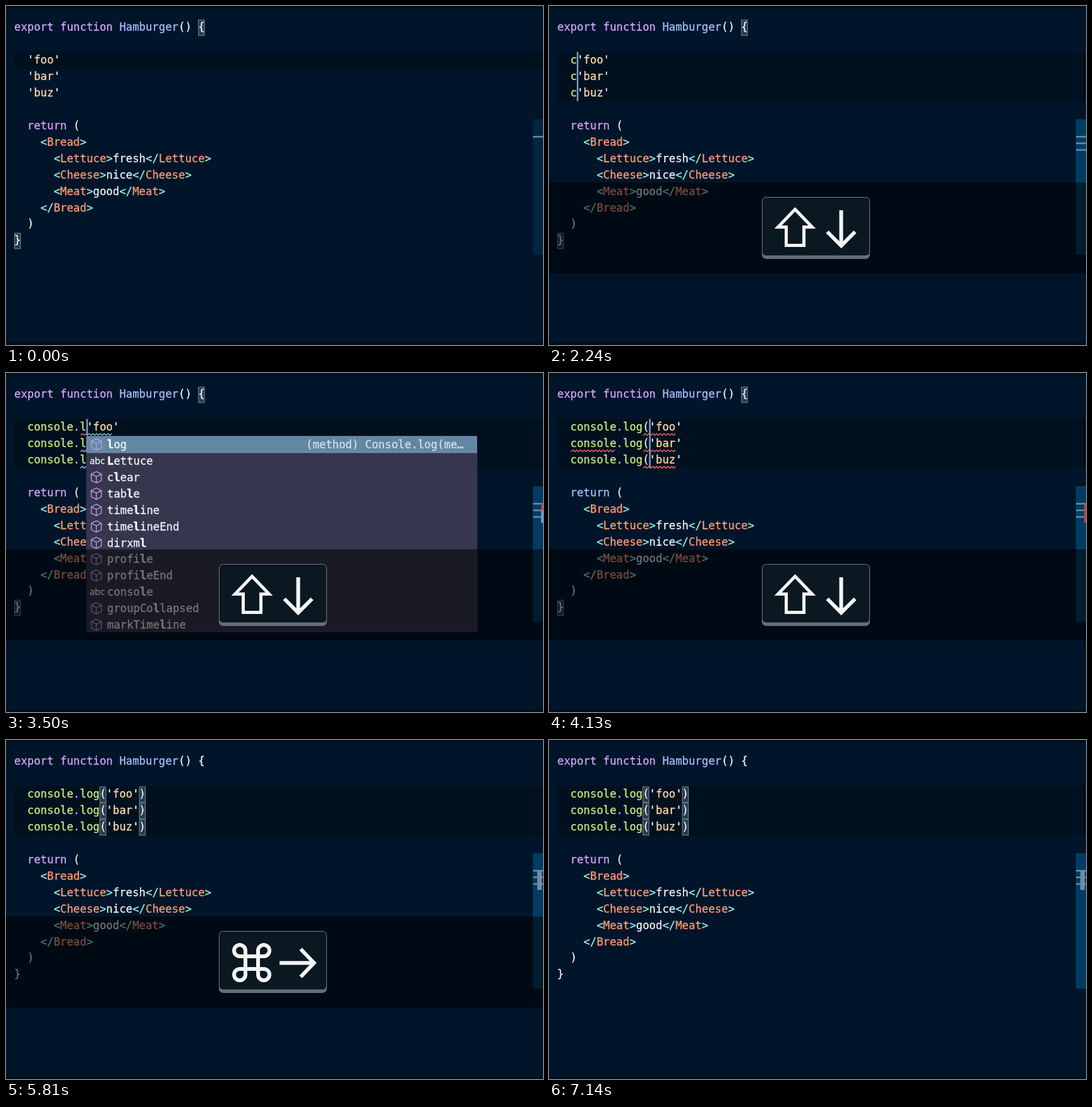
Recreate the animation shown at these times as an HTML page. Size 850x536 px, loop 7210 ms.

```html
<!DOCTYPE html>
<html lang="en">
<head>
<meta charset="utf-8">
<title>Multi-cursor editing</title>
<style>
  html, body { margin: 0; width: 100%; height: 100%; overflow: hidden; background: #001529; }
  svg { display: block; width: 850px; height: 536px; }
  text {
    font: 17.27px "DejaVu Sans Mono", monospace; white-space: pre;
    color: #f1f4f9; fill: currentColor; stroke: currentColor; stroke-width: .3;
  }
  .kw { color: #d3a5fa; }
  .fn { color: #a6bfff; }
  .str { color: #fddbaa; }
  .quote { color: #f2fbf5; }
  .tag { color: #ff9c77; }
  .angle { color: #92f3e6; }
  .var { color: #c9ee80; }
  .hit { font-weight: bold; color: #fff; }
  .hint { color: #d3e0ea; }
  .abc { font: 14.5px "Open Sans", sans-serif; }
  .active { fill: #00101f; }
  .match { fill: #263b4b; stroke: #7d8b94; stroke-width: 1; }
  .caret { fill: #80a4c2; }
  .wave { fill: none; stroke-width: 1.5; }
  .cube { fill: none; stroke: #b79bdc; stroke-width: 1.4; stroke-linejoin: round; }
  .cap { fill: #0a1822; stroke: #727b82; }
  .glyph { fill: none; stroke: #f4f5f5; }
</style>
</head>
<body>
<svg viewBox="0 0 850 536">
  <rect width="850" height="536" fill="#001529"/>
  <rect width="850" height="3" y="1" fill="#000e1e"/>
  <rect width="850" height="4" y="532" fill="#000e1e"/>
  <g id="code"></g>
  <rect id="slider" x="834" y="179" width="16" height="214" fill="#003c62"/>
  <g id="marks"></g>
  <g id="popup"></g>
  <g id="overlay">
    <rect y="279" width="850" height="144" fill="#000" fill-opacity=".52"/>
    <g id="keys"></g>
  </g>
</svg>
<script>
const LOOP = 7210, STEP = 70;
const CW = 10.4, LH = 25.92, LEFT = 13, TOP = 20.7;
const RED = '#e8604f', BLUE = '#7fb0e6';
const words = ['foo', 'bar', 'buz'];
const call = 'console.log(';
const typed = [2170, 2310, 2380, 2520, 2590, 2730, 2800, 2940, 3290, 3640, 3780, 3990];
const at = { addSecond: 1400, addThird: 1750, lineEnd: 4760, close: 5250 };
const actions = [-500, at.addSecond, at.addThird, ...typed, at.lineEnd, at.close];

const el = id => document.getElementById(id);
const esc = s => s.replace(/&/g, '&amp;').replace(/</g, '&lt;');
const colX = c => LEFT + c * CW;
const rowY = r => TOP + r * LH;
const ramp = (t, a, b) => Math.min(1, Math.max(0, (t - a) / (b - a)));
const rect = (x, y, w, h, attrs) =>
  `<rect x="${x}" y="${y}" width="${w}" height="${h}" ${attrs}/>`;
const text = (x, y, cls, s) => `<text x="${x}" y="${y}" class="${cls}">${esc(s)}</text>`;

// Draws [class, text] tokens one after another on the character grid.
function line(row, col, tokens) {
  return tokens.map(([cls, s]) => {
    const out = text(colX(col), rowY(row) + 18.7, cls, s);
    col += s.length;
    return out;
  }).join('');
}

function element(row, col, name, body) {
  const open = [['angle', '<'], ['tag', name], ['angle', '>']];
  const close = [['angle', '</'], ['tag', name], ['angle', '>']];
  return line(row, col, body ? [...open, ['', body], ...close] : open);
}

function wave(row, from, to, color) {
  const y = rowY(row) + 24.6, end = colX(to);
  let d = '', up = true;
  for (let x = colX(from) + 1; x <= end; x += 3, up = !up) {
    d += `${d ? 'L' : 'M'}${x} ${y + (up ? 1.4 : -1.4)}`;
  }
  return `<path d="${d}" class="wave" stroke="${color}"/>`;
}

const match = (row, col) =>
  rect(colX(col) + .5, rowY(row) + 1.5, 9.4, 24.5, 'class="match"');

function waves(i, s) {
  const row = 2 + i, n = s.n, end = n + 2;
  if (!s.lint || s.closed) return '';
  if (n < 9) {
    const split = i ? 2 : 2 + Math.min(n, 7);
    return (i ? '' : wave(row, 2, split, RED)) + wave(row, split, end + 3, BLUE);
  }
  if (n < 12) return wave(row, 10, end, i ? BLUE : RED) + wave(row, end, end + 4, BLUE);
  return wave(row, 13, 18, RED) + (i === 1 ? wave(row, 2, 9, RED) : '');
}

function drawCode(s) {
  let out = rect(13, rowY(2), 837, LH * s.cursors, 'class="active"');
  if (!s.closed) out += match(0, 28) + match(13, 0);
  out += line(0, 0, [['kw', 'export '], ['kw', 'function '], ['fn', 'Hamburger'], ['', '() {']]);

  words.forEach((word, i) => {
    const head = call.slice(0, s.n);
    if (s.closed) out += match(2 + i, 13) + match(2 + i, 19);
    out += line(2 + i, 2, [
      ['var', head.slice(0, 7)], ['kw', head.slice(7, 8)],
      ['var', head.slice(8, 11)], ['', head.slice(11)],
      ['quote', "'"], ['str', word], ['quote', "'"], ['', s.closed ? ')' : '']
    ]);
    out += waves(i, s);
    if (s.caret && i < s.cursors) {
      const col = 2 + s.n + (s.atEnd ? 5 : 0) + (s.closed ? 1 : 0);
      out += rect(colX(col) - .2, rowY(2 + i), 2.4, LH, 'class="caret"');
    }
  });

  const unclosed = s.n === 12 && !s.closed;
  out += line(6, 2, [[unclosed ? 'fn' : 'kw', 'return '], ['', '(']]);
  out += element(7, 4, 'Bread');
  out += element(8, 6, 'Lettuce', 'fresh');
  out += element(9, 6, 'Cheese', 'nice');
  out += element(10, 6, 'Meat', 'good');
  out += line(11, 4, [['angle', '</'], ['tag', 'Bread'], ['angle', '>']]);
  return out + line(12, 2, [['', ')']]) + line(13, 0, [['', '}']]);
}

function drawMarks(s) {
  let out = '';
  for (let i = 0; i < s.cursors; i++) {
    out += rect(834, 205.5 + i * 10.4, 16, 2.5, 'fill="#6b8ba8"');
  }
  if (s.closed) return out + rect(841, 206, 7, 31, 'fill="#6f8ca3"');
  if (s.lint) {
    const all = s.n === 12;
    if (!all) out += rect(847, 207, 3, 30, 'fill="#5b9fe0"');
    out += rect(847, 207, 3, all ? 30 : 10, 'fill="#b8404c"');
  }
  return out;
}

const cube = y => `<path class="cube" transform="translate(143 ${y})"
  d="M0-9L8-5V5L0 9L-8 5V-5ZM-8-5L0-1L8-5M0-1V9"/>`;

function drawPopup(s) {
  if (!s.popup) return '';
  const items = s.n > 9 ? ['log'] : ['log', 'Lettuce', 'clear', 'table', 'timeline', 'timelineEnd',
    'dirxml', 'profile', 'profileEnd', 'console', 'groupCollapsed', 'markTimeline'];
  const offset = colX(s.n + 2) - 127.4;
  let out = rect(127, 99, 619, items.length * LH, 'fill="#37364f"');
  out += rect(127.5, 100.5, 617.5, 25.5,
    'fill="#6287a3" stroke="#a9c0d0" stroke-dasharray="1 1"');
  items.forEach((item, i) => {
    const y = 113 + i * LH;
    const k = item.search(/l/i), end = k + s.n - 8;
    out += /^(Lettuce|console)$/.test(item) ? text(132.5, y + 5, 'abc', 'abc') : cube(y);
    out += text(160, y + 6, '', item.slice(0, k));
    out += text(160 + k * CW, y + 6, 'hit', item.slice(k, end));
    out += text(160 + end * CW, y + 6, '', item.slice(end));
  });
  out += text(475, 119, 'hint', '(method) Console.log(me…');
  return `<g transform="translate(${offset} 0)">${out}</g>`;
}

const glyph = (x, d, width = 6) =>
  `<path class="glyph" transform="translate(${x} 352)" stroke-width="${width}" d="${d}"/>`;
const shift = x => glyph(x, 'M0-30.5L27-2.5H14V26.5H-14V-2.5H-27Z', 5);
const command = x => glyph(x, `M-10-19V19A9 9 0 1 1-19 10H19A9 9 0 1 1 10 19
  V-19A9 9 0 1 1 19-10H-19A9 9 0 1 1-10-19Z`);

function keyCap(x, w) {
  return `<rect x="${x}" y="304" width="${w}" height="96" rx="7" fill="#646e75"/>
    <rect class="cap" x="${x + .5}" y="302.5" width="${w - 1}" height="92.5" rx="6"/>`;
}

const keyViews = [
  keyCap(320, 205) + shift(373) + command(453.5) + glyph(503, 'M0-30V30', 8),
  keyCap(337, 171) + shift(389.5) + glyph(462.5, 'M0-29V26M-22 5L0 27L22 5'),
  keyCap(337, 171) + command(389) + glyph(462.5, 'M-29.5 .5H24M4-21.5L25 .5L4 22.5')
];

function stateAt(t) {
  const n = typed.filter(x => x <= t).length;
  const last = actions.filter(x => x <= t).pop();
  return {
    n,
    cursors: t < at.addSecond ? 1 : t < at.addThird ? 2 : 3,
    atEnd: t >= at.lineEnd,
    closed: t >= at.close,
    lint: t >= 2450,
    popup: t >= 3360 && t < typed[11],
    caret: Math.floor((t - last) / 500) % 2 === 0,
    keys: t < at.addSecond ? 0 : t < at.lineEnd ? 1 : 2
  };
}

let shown = '';
function frame(now) {
  const t = Math.floor((now % LOOP) / STEP) * STEP;
  const s = stateAt(t), key = JSON.stringify(s);
  if (key !== shown) {
    shown = key;
    el('code').innerHTML = drawCode(s);
    el('marks').innerHTML = drawMarks(s);
    el('popup').innerHTML = drawPopup(s);
    el('keys').innerHTML = keyViews[s.keys];
  }
  el('slider').setAttribute('opacity', .42 + .58 * ramp(t, 70, 350));
  el('overlay').setAttribute('opacity', ramp(t, 350, 560) * (1 - ramp(t, 5950, 6300)));
  requestAnimationFrame(frame);
}
requestAnimationFrame(frame);
</script>
</body>
</html>
```
